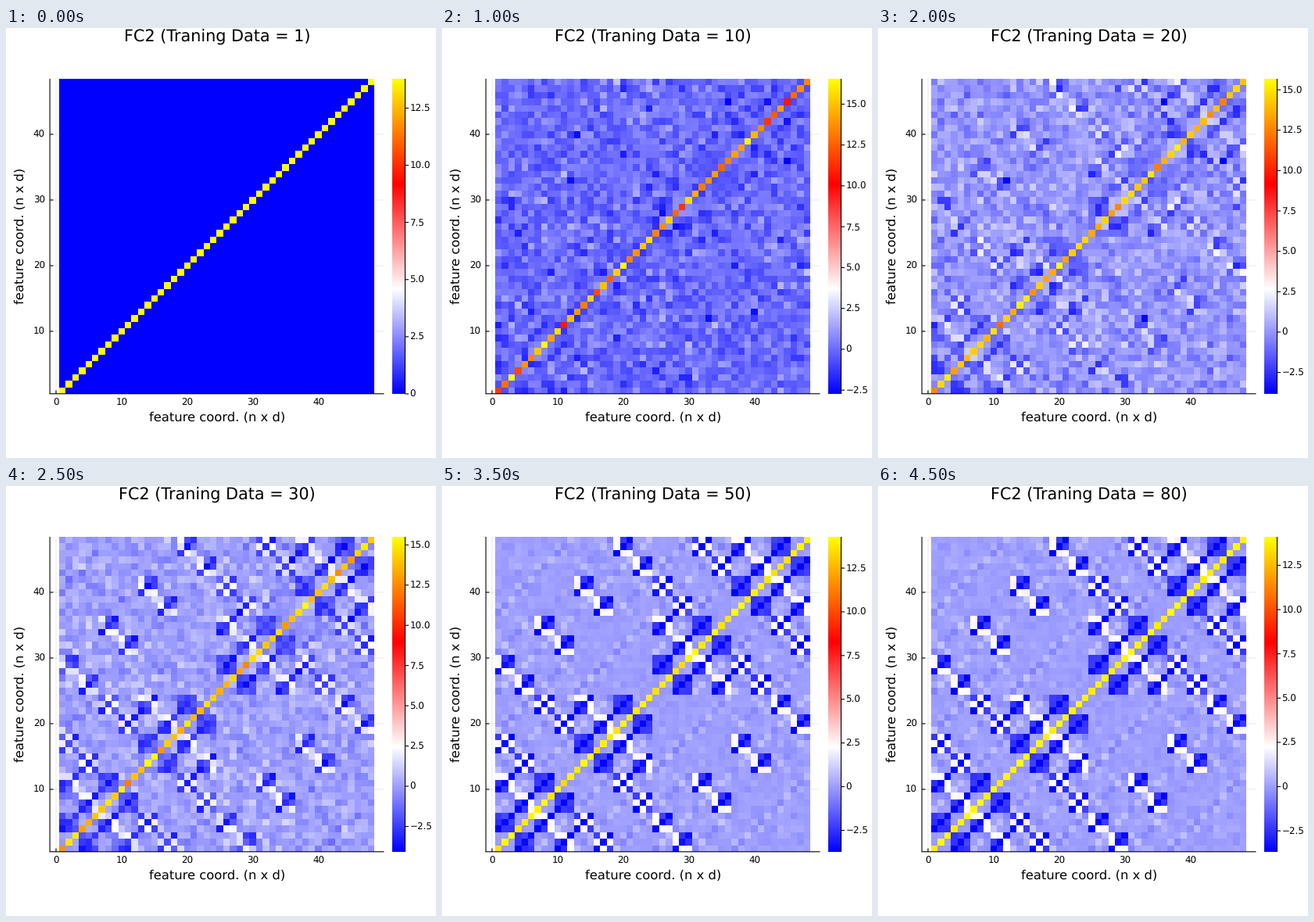
Write a matplotlib script that moves like this. It is 550x550 px and loops after 5000 ms.

```python
import numpy as np
import matplotlib.pyplot as plt
from matplotlib.animation import FuncAnimation
from matplotlib.colors import LinearSegmentedColormap

plt.rcParams["font.family"] = "DejaVu Sans"
plt.rcParams["text.hinting"] = "none"
SIZE, DPI = 550, 100
PX = 72 / DPI
N = 48
LEFT, RIGHT, TOP, BOTTOM = 68, 471, 65, 468
BAR_L, BAR_R = 494, 510.5
COUNTS = [1, 5, 10, 15, 20, 30, 40, 50, 60, 80]


def limits(count):
    """Colour limits, eased between a few training sizes."""
    keys = [1, 5, 10, 15, 30, 50, 80]
    lo = np.interp(count, keys, [0, -1.78, -2.73, -3.7, -4.08, -3.73, -3.69])
    hi = np.interp(count, keys, [13.78, 15.7, 16.55, 15.77, 15.5, 14.29, 14.11])
    return lo, hi


def learned(count):
    """Share of the lattice structure recovered so far."""
    s = min(1, count / 40)
    return s * s * (3 - 2 * s)


def noise_level(count):
    return 0.13 + 0.52 * np.sin(np.pi * min(1, np.sqrt(count / 50)))


def block(v, on, off, rest):
    """3x3 coupling for a neighbour in direction v."""
    m = off * np.outer(v, v).astype(float)
    np.fill_diagonal(m, np.where(v == 0, rest, on))
    return m


def lattice():
    """Couplings of a diamond lattice of 2x2x2 cells with two atoms each."""
    m = np.zeros((N, N))
    corner = np.ones(3, int)
    bonds = {0: corner}
    for k in range(3):
        bonds[1 << k] = corner - 2 * (np.arange(3) == 2 - k)
    for a in range(16):
        for b in range(16):
            d = (a // 2) ^ (b // 2)
            if a % 2 != b % 2:
                if d not in bonds:
                    continue
                c = block(bonds[d], -3.65, -2.35, 0)
            elif d in (0, 7):
                continue
            else:
                # a second neighbour lies two bonds away
                low = d & -d
                step = (bonds[low] - bonds[d - low]) // 2
                c = block(step, -0.5, -0.45, 0.75)
            m[3 * a:3 * a + 3, 3 * b:3 * b + 3] = c
    return m


def mirror(m):
    return np.triu(m) + np.triu(m, 1).T


def build():
    rng = np.random.default_rng(12)
    full = lattice()
    power = mirror(rng.uniform(0.3, 1.7, (N, N)))
    field = mirror(rng.standard_normal((N, N)))
    out = [np.eye(N) * limits(1)[1]]
    for count in COUNTS[1:]:
        lo, hi = limits(count)
        fresh = mirror(rng.standard_normal((N, N)))
        w = 0.5 * max(0, 1 - count / 60)
        field = np.sqrt(1 - w) * field + np.sqrt(w) * fresh
        m = full * learned(count) ** power + noise_level(count) * field
        spread = np.diag(field)
        np.fill_diagonal(m, 13.8 + (hi - 13.8) * spread / spread.max())
        out.append(np.clip(m, lo, hi))
    return out


DATA = build()
CMAP = LinearSegmentedColormap.from_list(
    "heat", ["#0000ff", "#ffffff", "#ff0000", "#ffff00"], N=768)

fig = plt.figure(figsize=(SIZE / DPI, SIZE / DPI), dpi=DPI, facecolor="white")
ax = fig.add_axes([0, 0, 1, 1])
ax.axis("off")


def line(x, y, z=1, alpha=1):
    return ax.plot(x, y, color="black", lw=1.1 * PX, alpha=alpha, zorder=z,
                   solid_capstyle="butt", snap=False)[0]


def text(x, y, s, px, **kw):
    return ax.text(x, y, s, fontsize=px * PX, va="baseline", **kw)


def image(data, x0, x1, origin):
    return ax.imshow(data, cmap=CMAP, origin=origin, aspect="auto",
                     extent=(x0, x1, BOTTOM, TOP), interpolation="nearest",
                     zorder=3)


def col(i):
    return 64 + 8.4 * i


def row(j):
    return 472 - 8.4 * j


heat = image(DATA[0], LEFT, RIGHT, "lower")
image(np.linspace(0, 1, 403)[:, None], BAR_L, 510, "lower")
ax.set_xlim(0, SIZE)
ax.set_ylim(SIZE, 0)

for t in range(0, 50, 10):
    line([col(t)] * 2, [TOP, BOTTOM], alpha=0.08)
    line([col(t)] * 2, [463.5, BOTTOM])
    text(col(t), 483, str(t), 11.9, ha="center")
    if t:
        line([56.1, 483.5], [row(t)] * 2, alpha=0.08)
        line([56.1, 60.5], [row(t)] * 2)
        text(50, row(t) + 4.3, str(t), 11.9, ha="right")
line([56.1, 56.1], [TOP, BOTTOM], z=4)
line([55.6, 483.5], [467.8, 467.8], z=4)
line([BAR_R, BAR_R], [TOP, BOTTOM], z=4)

LABEL = "feature coord. (n x d)"
text(270.5, 503, LABEL, 16.4, ha="center")
text(22.5, 266, LABEL, 16.4, ha="center", rotation=90, rotation_mode="anchor")
title = text(270, 18, "", 20.8, ha="center")

TICKS = np.arange(-2.5, 15.1, 2.5)
marks = [(line([BAR_R, 515], [0, 0], z=4), text(516.5, 0, "", 11.9, ha="left"))
         for _ in TICKS]


def draw(k):
    count = COUNTS[k]
    lo, hi = limits(count)
    title.set_text(f"FC2 (Traning Data = {count})")
    heat.set_data(DATA[k])
    heat.set_clim(lo, hi)
    for v, (tick, label) in zip(TICKS, marks):
        y = BOTTOM - (v - lo) / (hi - lo) * (BOTTOM - TOP)
        tick.set_ydata([y, y])
        label.set_y(y + 4.3)
        label.set_text(f"{v:.1f}".replace("-", "\u2212") if v else "0")
        for part in (tick, label):
            part.set_visible(bool(lo <= v <= hi))
    return [title, heat]


anim = FuncAnimation(fig, draw, frames=len(COUNTS), interval=500,
                     repeat=True, repeat_delay=0, blit=False)
plt.show()
```
